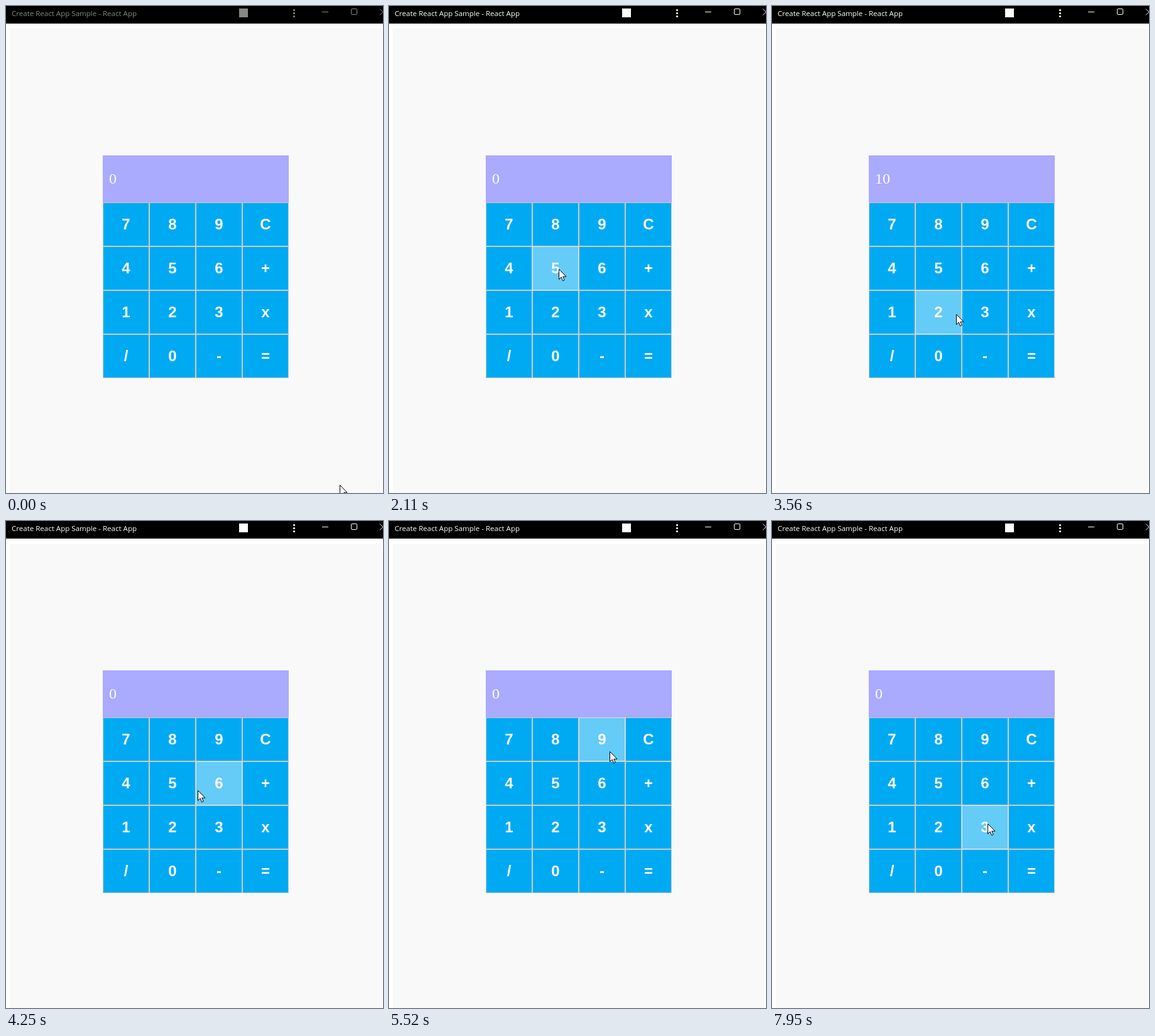
Write an HTML page that moves like this. It is 600 by 776 pixels and loops after 8 s.

```html
<!DOCTYPE html>
<html lang="en">
<head>
<meta charset="utf-8">
<title>Calculator</title>
<style>
  html, body { margin: 0; width: 100%; height: 100%; overflow: hidden; background: #fff; }
  #stage { position: relative; width: 600px; height: 776px; overflow: hidden; background: #fff; }
  #stage > * { position: absolute; }
  #bar { left: 0; top: 0; width: 600px; height: 28px; background: #000; }
  #chrome { left: 0; top: 0; }
  #chrome text { font: 11.55px "Open Sans", "Noto Sans", sans-serif; }
  #page { left: 6px; top: 36px; width: 592px; height: 740px; background: #f9f9f9; }
  #display {
    left: 154px; top: 238px; width: 286px; height: 75px; padding-left: 10px;
    background: #aaf; color: #fff; font: 24px/75px "Liberation Serif", serif;
  }
  #keys {
    left: 154px; top: 313px; background: #fff;
    display: grid; grid-template-columns: repeat(4, 74px); grid-auto-rows: 70px;
  }
  #keys div {
    box-sizing: border-box; border: 1px solid #ccc; background: #00aaf2; color: #fff;
    font: bold 24px/68px "Liberation Sans", sans-serif; text-align: center;
  }
  #keys .hover { opacity: .6; }
  #cursor { left: 0; top: 0; overflow: visible; }
</style>
</head>
<body>
<div id="stage">
  <div id="bar"></div>
  <svg id="chrome" width="600" height="28" fill="#fff">
    <text x="9" y="16">Create React App Sample - React App</text>
    <rect x="371" y="4" width="14" height="14"/>
    <circle cx="458.5" cy="6.5" r="1.6"/>
    <circle cx="458.5" cy="11.5" r="1.6"/>
    <circle cx="458.5" cy="16.5" r="1.6"/>
    <g fill="none" stroke="#fff">
      <path d="M503 9.5H513M595 4.5l10 10m0-10l-10 10"/>
      <rect x="549.5" y="4.5" width="9" height="9" rx="1.5"/>
    </g>
  </svg>
  <div id="page"></div>
  <div id="display"></div>
  <div id="keys"></div>
  <svg id="cursor" width="13" height="20">
    <path d="M.5.5V16.5L4.2 13 6.7 18.8 9.2 17.7 6.8 12.2H12Z" fill="#fff" stroke="#000"/>
  </svg>
</div>
<script>
const LOOP = 8000;
const REFRESH = 70;
const LABELS = [..."789C456+123x/0-="];
const START = { x: 531, y: 763 };

// Each visit: leave the last stop, arrive at a point, optionally press the key there.
const VISITS = [
  { leave: 0, arrive: 570, x: 268, y: 496 },
  { leave: 640, arrive: 840, x: 270, y: 419, press: 1110 },
  { leave: 1250, arrive: 1700, x: 407, y: 424, press: 1840 },
  { leave: 1910, arrive: 2060, x: 270, y: 419, press: 2290 },
  { leave: 2330, arrive: 2750, x: 428, y: 574, press: 3010 },
  { leave: 3080, arrive: 3290, x: 500, y: 634 },
  { leave: 3290, arrive: 3560, x: 293, y: 491 },
  { leave: 3560, arrive: 3910, x: 407, y: 350, press: 3980 },
  { leave: 3980, arrive: 4190, x: 305, y: 429 },
  { leave: 4260, arrive: 4340, x: 270, y: 424, press: 4410 },
  { leave: 4480, arrive: 4780, x: 420, y: 506, press: 4850 },
  { leave: 5080, arrive: 5450, x: 351, y: 367, press: 5660 },
  { leave: 5730, arrive: 6180, x: 408, y: 567, press: 6330 },
  { leave: 6880, arrive: 7080, x: 410, y: 350, press: 7340 },
  { leave: 7340, arrive: 7760, x: 342, y: 499 },
  { leave: 7880, arrive: 7950, x: 343, y: 482 }
];

const byId = id => document.getElementById(id);
const chrome = byId("chrome"), display = byId("display"), cursor = byId("cursor");

const keys = LABELS.map(label => {
  const key = document.createElement("div");
  key.textContent = label;
  byId("keys").append(key);
  return key;
});

const smooth = k => k * k * (3 - 2 * k);

function pointerAt(t) {
  const i = VISITS.findLastIndex(visit => visit.leave <= t);
  const to = VISITS[i], from = VISITS[i - 1] || START;
  const elapsed = Math.floor((t - to.leave) / REFRESH + .15) * REFRESH;
  const k = t >= to.arrive ? 1 : smooth(Math.min(1, elapsed / (to.arrive - to.leave)));
  const mix = axis => Math.round(from[axis] + (to[axis] - from[axis]) * k);
  return { x: mix("x"), y: mix("y") };
}

function keyAt({ x, y }) {
  const col = Math.floor((x - 154) / 74), row = Math.floor((y - 313) / 70);
  return col >= 0 && col < 4 && row >= 0 && row < 4 ? row * 4 + col : -1;
}

const operations = {
  "+": (a, b) => a + b, "-": (a, b) => a - b, "x": (a, b) => a * b, "/": (a, b) => a / b
};

function calculate(labels) {
  let entry = 0, stored = 0, operator = "+";
  for (const label of labels) {
    if (label === "C") entry = 0;
    else if (label === "=") entry = operations[operator](stored, entry);
    else if (label in operations) [stored, operator, entry] = [entry, label, 0];
    else entry = entry * 10 + Number(label);
  }
  return entry;
}

function render(t) {
  const pointer = pointerAt(t);
  const pressed = VISITS.filter(visit => visit.press <= t).map(visit => LABELS[keyAt(visit)]);
  const hovered = keyAt(pointer);
  keys.forEach((key, i) => key.classList.toggle("hover", i === hovered));
  cursor.style.transform = `translate(${pointer.x}px, ${pointer.y}px)`;
  chrome.style.opacity = pressed.length ? 1 : .53;
  display.textContent = calculate(pressed);
}

const origin = performance.now();
function tick() {
  render((performance.now() - origin) % LOOP);
  requestAnimationFrame(tick);
}
tick();
</script>
</body>
</html>
```
